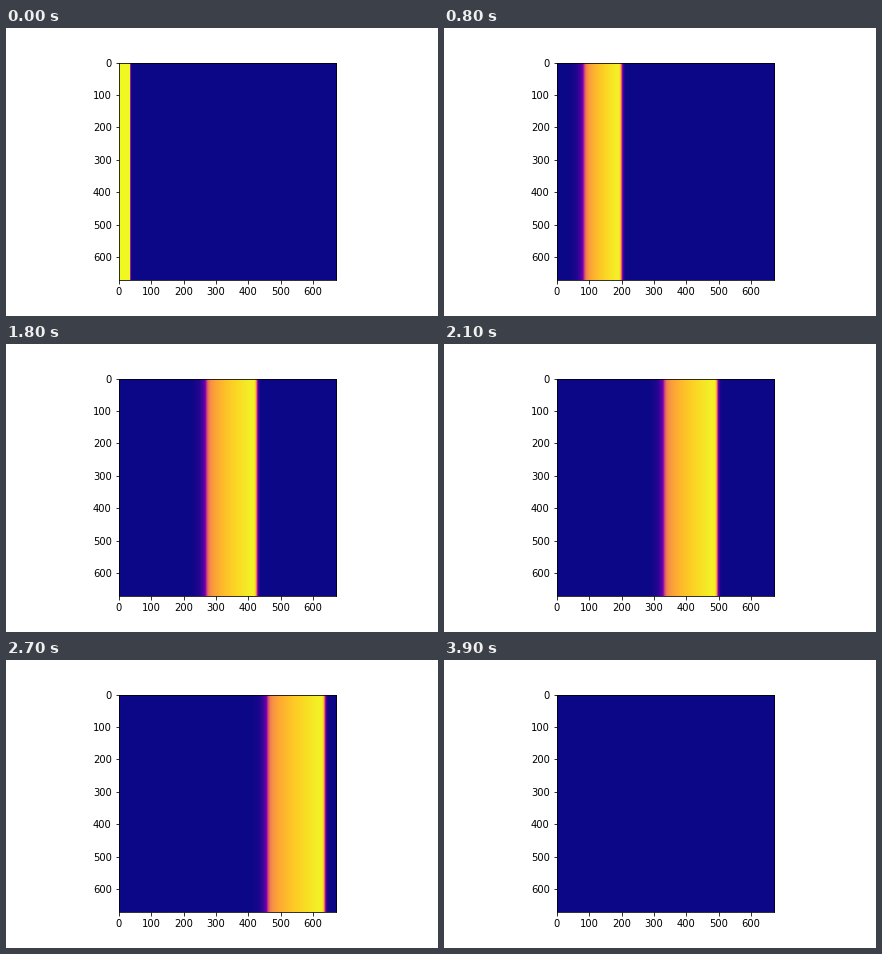
Animation of 432x288 px, one loop 4.8 s. Source, as a matplotlib script:

```python
import numpy as np
import matplotlib.pyplot as plt
from matplotlib.animation import FuncAnimation

SIZE = 672        # cells per side
STRIP = 35        # width of the excited strip at the start
FRAMES = 48
INTERVAL = 100

x = np.arange(SIZE) + 0.5


def sigmoid(z):
    return 1 / (1 + np.exp(-np.clip(z, -60, 60)))


def front_at(n):
    """Leading edge: starts slowly, then settles to a constant speed."""
    return STRIP + 23.6 * n - 39 * (1 - np.exp(-n / 8.3))


def back_at(n):
    """Recovery edge: speeds up until it keeps pace with the front."""
    d = n - 8
    return 81 + 17.4 * d + 0.1225 * d * d


def profile(n):
    """Excitation along x at step n."""
    if n == 0:
        return np.where(x < STRIP, 1.0, 0.0)
    front, back = front_at(n), back_at(n)
    # Past the border the plateau stretches at half speed
    head = min(front, SIZE + 0.5 * (front - SIZE))
    phase = np.clip((x - back) / (head - back), 0, 1)
    plateau = (0.55 + 0.45 * phase ** 0.37) * sigmoid((x - back) / 3.5)
    tail = 0.275 * np.exp(np.minimum(x - back, 0) / 10)
    wave = np.where(x > back, plateau, tail)
    return wave * sigmoid((front - x) / 2.2)


def field(n):
    return np.tile(profile(n), (SIZE, 1))


fig, ax = plt.subplots(figsize=(6, 4), dpi=72)
fig.subplots_adjust(left=0.125, right=0.9, bottom=0.125, top=0.88)
image = ax.imshow(field(0), cmap="plasma", vmin=0, vmax=1)


def update(n):
    image.set_data(field(n))
    return [image]


anim = FuncAnimation(fig, update, frames=FRAMES, interval=INTERVAL,
                     repeat=True, repeat_delay=0, blit=False)
plt.show()
```
